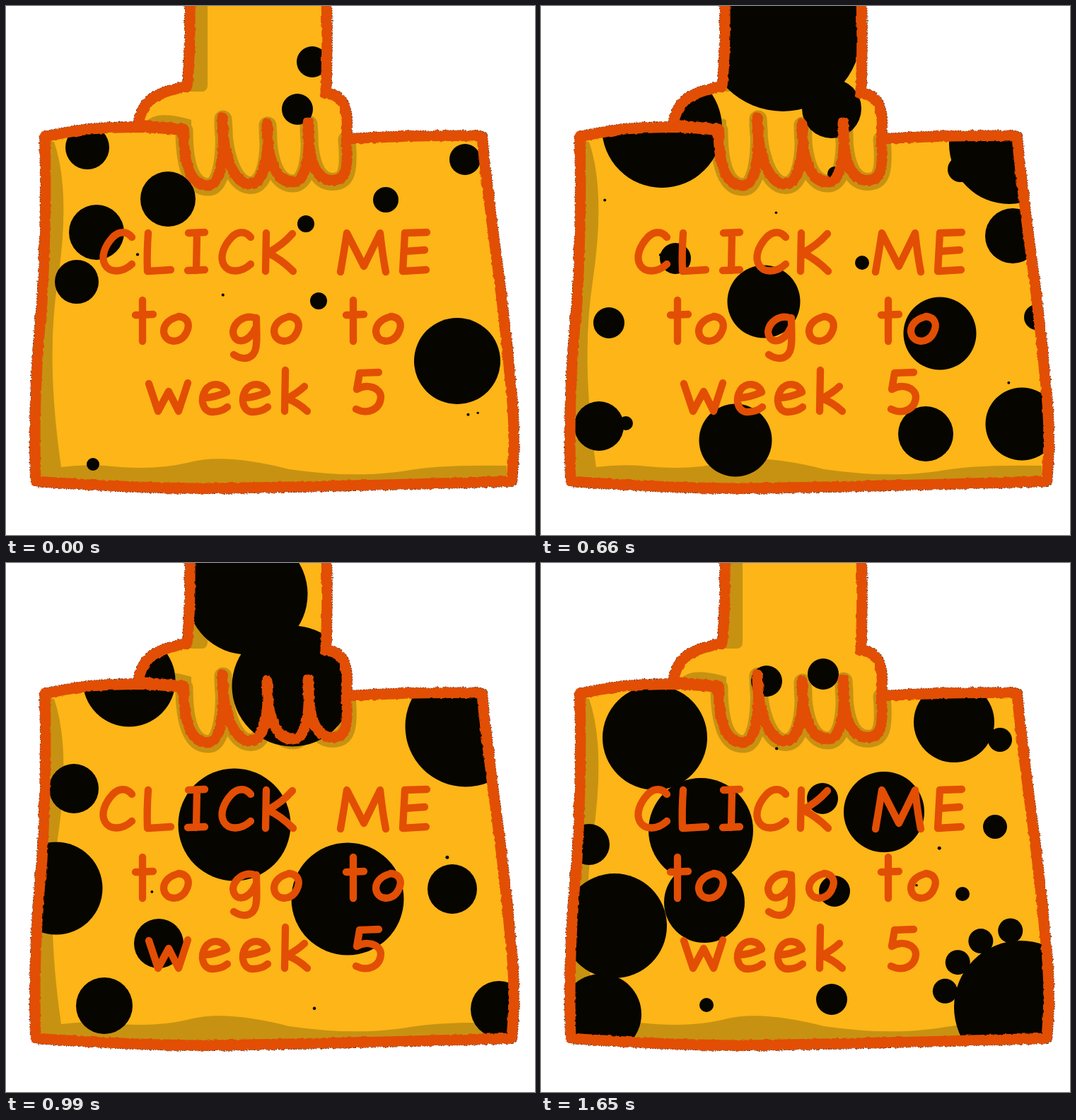
Animation of 748x748 px, one loop 1980 ms. Source, as an HTML page:

```html
<!DOCTYPE html>
<html lang="en">
<head>
<meta charset="utf-8">
<title>Click me to go to week 5</title>
<style>
  html, body { margin: 0; width: 100%; height: 100%; overflow: hidden; background: #fff; }
  svg { display: block; width: 100vw; height: 100vh; }
  .line, .edge, .band { fill: none; stroke-linejoin: round; }
  .line, .band { stroke-linecap: round; }
  .line { stroke: #e24e04; }
  .edge { stroke: #2b1204; stroke-width: 16; stroke-dasharray: 2 1.5; }
  .band { stroke: #c79212; }
</style>
</head>
<body>
<svg viewBox="0 0 748 748" role="img" aria-label="CLICK ME to go to week 5">
  <defs>
    <filter id="rough" filterUnits="userSpaceOnUse" x="0" y="-20" width="748" height="768" color-interpolation-filters="sRGB">
      <feTurbulence type="fractalNoise" baseFrequency=".16" numOctaves="2" seed="4"/>
      <feDisplacementMap in="SourceGraphic" scale="4" xChannelSelector="R" yChannelSelector="G"/>
    </filter>
    <path id="bag" d="M484 188Q590 182 673 184Q678 240 692 345T712 520Q722 600 715 672
      Q480 679 290 682Q180 682 42 672Q38 550 51 420Q58 290 55 185Q85 178 118 174Q190 168 252 176"/>
    <path id="hand"/>
    <path id="fingers"/>
    <clipPath id="body"><use href="#bag"/><use href="#hand"/></clipPath>

    <path id="C" d="M45 11C38 2 27 2 18 11C6 24 1 39 7 50C14 62 32 61 45 49"/>
    <path id="t" d="M14 0V58M4 21L29 20"/>
    <path id="o" d="M6 4C-7 6-17 14-17 25C-16 42 7 44 15 27C21 15 17 5 4 4"/>
    <path id="e" d="M5 22C15 22 27 19 38 14C33 0 15 0 8 11C0 24 4 42 18 42C27 42 34 39 39 35"/>
  </defs>

  <rect width="748" height="748" fill="#fff"/>
  <g class="edge" filter="url(#rough)"><use href="#bag"/><use href="#hand"/></g>
  <g fill="#fdb517"><use href="#bag"/><use href="#hand"/></g>

  <g clip-path="url(#body)">
    <g fill="#c79212">
      <rect x="255" y="-10" width="30" height="131" rx="8"/>
      <path d="M57 190L68 192Q92 262 73 390Q56 500 78 652Q110 648 140 650
        Q210 658 260 645T400 655Q490 668 560 658Q610 648 708 650V690H38V590L55 350Z"/>
      <path d="M198 164Q212 146 262 161V176Z"/>
    </g>
    <use class="band" href="#fingers" stroke-width="25" x="1" y="2"/>
    <g id="spots" fill="#060500"></g>
  </g>

  <g class="line" stroke-width="15" filter="url(#rough)"><use href="#bag"/><use href="#hand"/></g>

  <g class="line" stroke-width="10.3">
    <use href="#C" x="133" y="316"/>
    <path d="M201 321Q199 350 200 375Q218 374 233 373"/>
    <path d="M258 321L281 320M270 321L269 374M257 374L281 373"/>
    <use href="#C" x="301" y="316"/>
    <path d="M368 321L367 375M405 322Q390 339 370 349Q389 358 406 375"/>
    <path d="M473 376Q478 347 482 321L506 368L529 321Q532 350 537 376"/>
    <path d="M595 320L564 321L561 375L594 373M563 347L592 345"/>

    <use href="#t" x="179" y="416"/>
    <use href="#o" x="240" y="435"/>
    <path d="M352 441C338 436 323 446 321 460C322 480 344 477 353 455M354 441C354 460 356 477 352 488C346 501 333 500 322 493"/>
    <use href="#o" x="396" y="435"/>
    <use href="#t" x="477" y="416"/>
    <use href="#o" x="540" y="435"/>

    <path d="M202 534L215 573L230 545L244 573L257 533"/>
    <use href="#e" x="274" y="532"/>
    <use href="#e" x="331" y="532"/>
    <path d="M395 515L394 573M422 538Q411 548 397 555Q412 560 426 573"/>
    <path d="M527 518L500 519L496 542C511 533 530 540 530 553C529 571 511 578 495 570"/>
  </g>
</svg>
<script>
  const HOLD = 330;
  const byId = id => document.getElementById(id);

  function make(name, attrs, parent) {
    const node = document.createElementNS('http://www.w3.org/2000/svg', name);
    for (const key in attrs) node.setAttribute(key, attrs[key]);
    return parent.appendChild(node);
  }

  // Each finger is a U between two neighbouring knuckles.
  const knuckles = [[251, 174], [306, 158], [369, 167], [427, 165], [481, 187]];
  const fingers = knuckles.slice(1).map(([x1, y1], i) => {
    const [x0, y0] = knuckles[i];
    const low = 254 - 2.5 * i;
    const mid = x0 + 0.62 * (x1 - x0);
    return `C${x0} ${y0 + 50} ${mid - 24} ${low} ${mid} ${low}` +
           `C${mid + 20} ${low} ${x1 + 4} ${y1 + 45} ${x1} ${y1}`;
  }).join('');
  byId('fingers').setAttribute('d', 'M251 174' + fingers);
  byId('hand').setAttribute('d',
    'M260 -12Q261 70 256 114Q220 120 204 133Q190 146 187 168L251 174' + fingers +
    'Q485 158 477 138Q469 124 452 124Q455 60 453 -12');

  function random(seed) {
    return () => {
      const v = Math.sin(seed++ * 12.9898) * 43758.5453;
      return v - Math.floor(v);
    };
  }

  // Spots of one radius, given as x, y pairs.
  function dots(group, r, ...xy) {
    for (let i = 0; i < xy.length; i += 2) make('circle', { cx: xy[i], cy: xy[i + 1], r }, group);
  }

  function specks(group, seed) {
    const next = random(seed);
    for (let i = 0; i < 4; i++) dots(group, 1.5 + next(), 90 + 580 * next(), 200 + 460 * next());
  }

  // Small knobs along the rim of a large spot.
  function knobs(group, x, y, reach) {
    for (let i = 0; i < 4; i++) {
      const a = (192 + 23.5 * i) * Math.PI / 180;
      dots(group, 17.5, x + reach * Math.cos(a), y + reach * Math.sin(a));
    }
  }

  function sparse(g) {
    dots(g, 61, 638, 502);
    dots(g, 39, 229, 273, 128, 320);
    dots(g, 31, 115, 200, 100, 390);
    dots(g, 22, 433, 79, 412, 146, 649, 217);
    dots(g, 18, 537, 274);
    dots(g, 12, 424, 308, 442, 417);
    dots(g, 9, 123, 648);
  }

  function clustered(g) {
    dots(g, 94, 678, 628);
    knobs(g, 678, 628, 109);
    dots(g, 74, 161, 247, 226, 378, 104, 513);
    dots(g, 57, 231, 480, 85, 638, 584, 225, 485, 352);
    dots(g, 29, 68, 398);
    dots(g, 22, 319, 167, 399, 157, 398, 333, 415, 464, 411, 617);
    dots(g, 17, 649, 250, 642, 373);
    dots(g, 10, 234, 625, 596, 468);
  }

  function spread(g) {
    dots(g, 111, 342, 38);
    dots(g, 85, 171, 172, 662, 195);
    dots(g, 51.5, 315, 418, 564, 463, 275, 614, 680, 591);
    dots(g, 39, 667, 325, 544, 605);
    dots(g, 42, 411, 145);
    dots(g, 35, 82, 594);
    dots(g, 22, 190, 357, 96, 448);
    dots(g, 18, 593, 231, 701, 440);
    dots(g, 10, 454, 363, 120, 590, 415, 237);
  }

  function bold(g) {
    dots(g, 85.5, 341, 44, 405, 174, 650, 231);
    dots(g, 79.5, 323, 370, 483, 475);
    dots(g, 65.5, 174, 166, 71, 460);
    dots(g, 40, 139, 626, 697, 631);
    dots(g, 35, 96, 319, 631, 461, 216, 538);
  }

  const looks = [sparse, clustered, spread, bold].map((fill, i) => {
    const group = make('g', {}, byId('spots'));
    fill(group);
    specks(group, 10 * i + 3);
    return group;
  });

  // Steps through the looks and back again.
  function draw() {
    const last = looks.length - 1;
    const step = Math.floor(performance.now() / HOLD) % (2 * last);
    const shown = last - Math.abs(last - step);
    looks.forEach((group, i) => { group.style.display = i === shown ? '' : 'none'; });
    requestAnimationFrame(draw);
  }
  draw();
</script>
</body>
</html>
```
